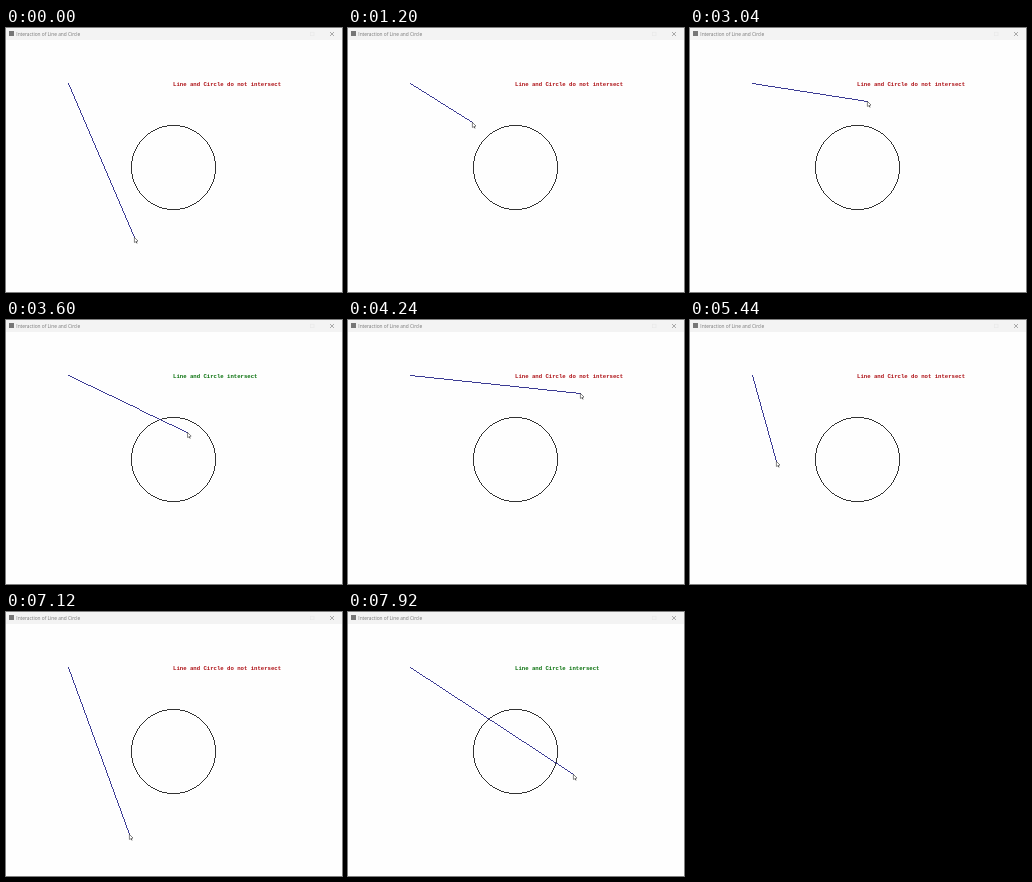
Animation of 336x264 px, one loop 8 s. Source, as an HTML page with a canvas:

```html
<!DOCTYPE html>
<html lang="en">
<head>
<meta charset="utf-8">
<title>Interaction of Line and Circle</title>
<style>
  html, body { margin: 0; width: 100%; height: 100%; overflow: hidden; background: #fefefe; }
  canvas { display: block; width: 336px; height: 264px; }
</style>
</head>
<body>
<canvas id="stage"></canvas>
<script>
const W = 336, H = 264, LOOP = 8000, STEP = 80;
const start = { x: 62, y: 55 };
const circle = { x: 167, y: 139, r: 42 };

// Places where the pointer comes to rest.
const poses = [
  { t: 80, x: 128, y: 209 },
  { t: 1200, x: 124, y: 94 },
  { t: 3040, x: 177, y: 73 },
  { t: 4240, x: 232, y: 73 },
  { t: 5440, x: 86, y: 141 },
  { t: 7120, x: 123, y: 222 },
  { t: 7200, x: 172, y: 170 },
  { t: 7920, x: 225, y: 162 }
];

const canvas = document.getElementById('stage');
const ratio = window.devicePixelRatio || 1;
canvas.width = W * ratio;
canvas.height = H * ratio;
const ctx = canvas.getContext('2d');
ctx.scale(ratio, ratio);

const mix = (a, b, k) => a + (b - a) * k;
const mixPoint = (a, b, k) => ({ x: mix(a.x, b.x, k), y: mix(a.y, b.y, k) });
const smooth = k => k * k * (3 - 2 * k);

// Longer trips bow further towards the circle.
function pointerAt(t) {
  const next = poses.findIndex(pose => pose.t > t);
  if (next === 0) return poses[0];
  if (next < 0) return poses[poses.length - 1];
  const a = poses[next - 1], b = poses[next];
  const duration = b.t - a.t;
  const k = smooth((t - a.t) / duration);
  const bow = Math.min(0.6, duration / 2000) * Math.sin(Math.PI * k);
  return mixPoint(mixPoint(a, b, k), circle, bow);
}

function segmentHitsCircle(a, b) {
  const dx = b.x - a.x, dy = b.y - a.y;
  const along = ((circle.x - a.x) * dx + (circle.y - a.y) * dy) / (dx * dx + dy * dy);
  const near = mixPoint(a, b, Math.max(0, Math.min(1, along)));
  return Math.hypot(near.x - circle.x, near.y - circle.y) <= circle.r;
}

function plot(x, y) {
  ctx.fillRect(Math.round(x), Math.round(y), 1, 1);
}

function pixelLine(a, b, color) {
  ctx.fillStyle = color;
  const steps = Math.ceil(Math.max(Math.abs(b.x - a.x), Math.abs(b.y - a.y)));
  for (let i = 0; i <= steps; i++) {
    const p = mixPoint(a, b, i / steps);
    plot(p.x, p.y);
  }
}

function pixelCircle({ x, y, r }, color) {
  ctx.fillStyle = color;
  for (let u = 0; u <= r * Math.SQRT1_2; u++) {
    const v = Math.round(Math.sqrt(r * r - u * u));
    for (const sx of [-1, 1]) for (const sy of [-1, 1]) {
      plot(x + sx * u, y + sy * v);
      plot(x + sx * v, y + sy * u);
    }
  }
}

function strokeLine(x0, y0, x1, y1, color, width = 0.6) {
  ctx.beginPath();
  ctx.moveTo(x0, y0);
  ctx.lineTo(x1, y1);
  ctx.strokeStyle = color;
  ctx.lineWidth = width;
  ctx.stroke();
}

function text(value, x, y, font, color) {
  ctx.font = font;
  ctx.fillStyle = color;
  ctx.fillText(value, x, y);
}

function drawTitleBar() {
  ctx.fillStyle = '#f3f3f3';
  ctx.fillRect(0, 0, W, 12);
  ctx.fillStyle = '#777';
  ctx.fillRect(3, 3, 5, 5);
  text('Interaction of Line and Circle', 10.3, 7.8, '4.8px "Open Sans", sans-serif', '#777');
  ctx.strokeStyle = '#e8e8e8';
  ctx.lineWidth = 0.6;
  ctx.strokeRect(304.5, 4.2, 3.5, 3.5);
  strokeLine(324, 4, 328, 8, '#777');
  strokeLine(328, 4, 324, 8, '#777');
}

function drawPointer({ x, y }) {
  ctx.save();
  ctx.translate(x + 0.4, y + 0.4);
  strokeLine(1.4, 3.4, 2.6, 6, '#333', 0.9);
  ctx.beginPath();
  ctx.moveTo(0, 0);
  ctx.lineTo(0, 5);
  ctx.lineTo(3.6, 3.6);
  ctx.closePath();
  ctx.fillStyle = '#fff';
  ctx.fill();
  ctx.strokeStyle = '#333';
  ctx.lineWidth = 0.6;
  ctx.stroke();
  ctx.restore();
}

function draw(t) {
  const end = pointerAt(t);
  const hit = segmentHitsCircle(start, end);

  ctx.fillStyle = '#fefefe';
  ctx.fillRect(0, 0, W, H);
  drawTitleBar();
  pixelCircle(circle, '#333');
  pixelLine(start, end, '#3c3c94');
  text(`Line and Circle ${hit ? '' : 'do not '}intersect`, 167, 58.2,
    'bold 5.63px "Liberation Mono", monospace', hit ? '#08700c' : '#ad1015');
  drawPointer(end);
}

function frame() {
  const t = performance.now() % LOOP;
  draw(Math.floor(t / STEP) * STEP);
  requestAnimationFrame(frame);
}
frame();
</script>
</body>
</html>
```
